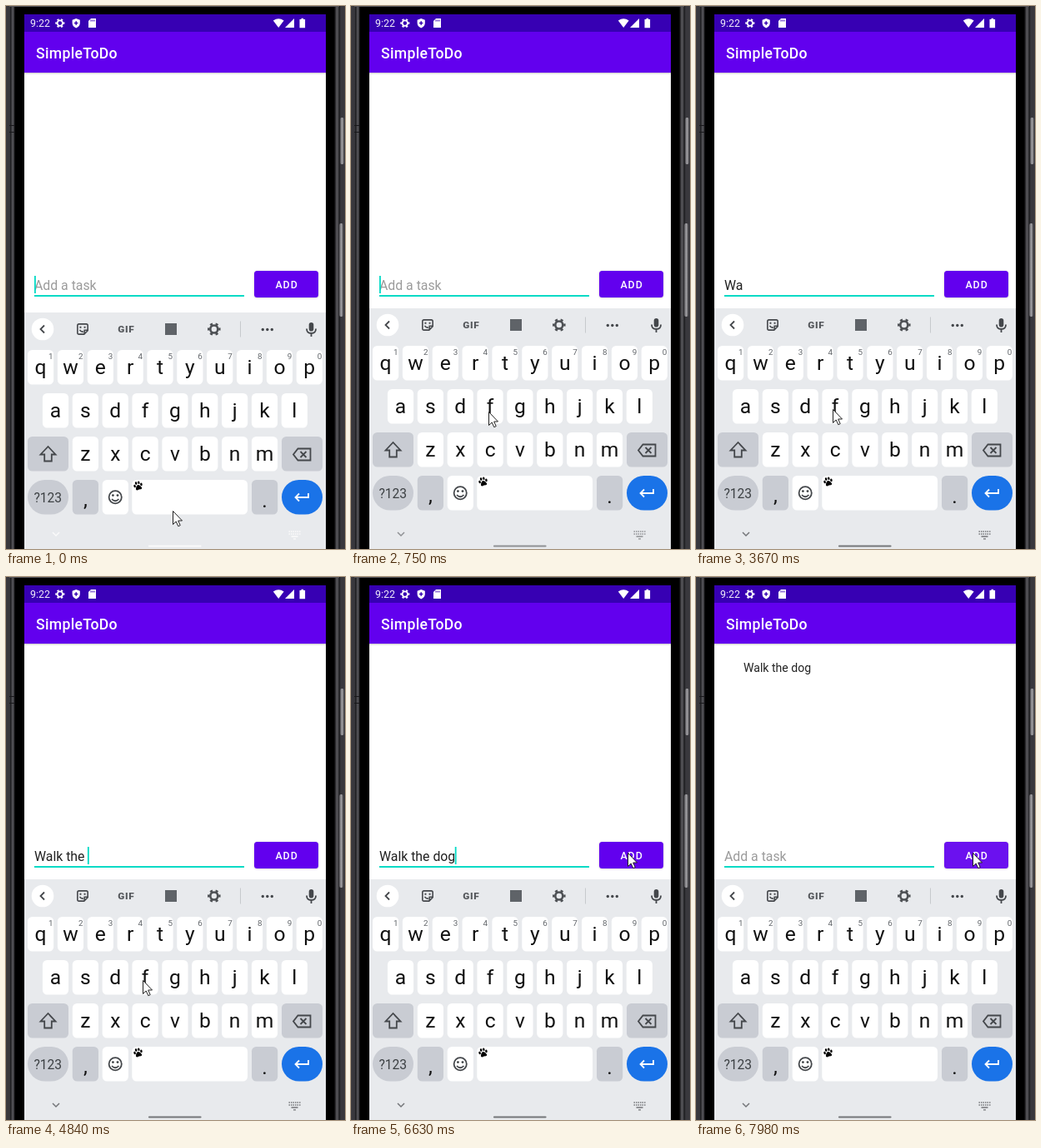
Recreate the animation shown at these times as an HTML page. Size 407x652 px, loop 8000 ms.

```html
<!DOCTYPE html>
<html lang="en">
<head>
<meta charset="utf-8">
<title>To-do list</title>
<style>
html, body { margin: 0; width: 100%; height: 100%; overflow: hidden; background: #000; }
svg { display: block; width: 407px; height: 652px; }
text { font-family: Roboto, "Noto Sans", sans-serif; white-space: pre; }
.mid { text-anchor: middle; }
.field { font-size: 15.84px; }
.key { font-size: 24.6px; fill: #111; }
.hint { font-size: 9.8px; fill: #5f6368; }
.line { fill: none; stroke: #44474b; stroke-width: 1.8; }
</style>
</head>
<body>
<svg viewBox="0 0 407 652">
  <defs>
    <linearGradient id="edgeL">
      <stop offset="0" stop-color="#39383d"/><stop offset=".4" stop-color="#39383d"/>
      <stop offset=".5" stop-color="#1f1f22"/><stop offset=".75" stop-color="#5c5b60"/>
      <stop offset="1" stop-color="#000"/>
    </linearGradient>
    <linearGradient id="edgeR">
      <stop offset="0" stop-color="#000"/><stop offset=".25" stop-color="#5c5b60"/>
      <stop offset=".5" stop-color="#1f1f22"/><stop offset=".6" stop-color="#39383d"/>
      <stop offset="1" stop-color="#39383d"/>
    </linearGradient>
    <linearGradient id="side">
      <stop offset="0" stop-color="#4a494d"/><stop offset=".5" stop-color="#a3a2a6"/>
      <stop offset="1" stop-color="#4a494d"/>
    </linearGradient>
    <linearGradient id="barShade" x2="0" y2="1">
      <stop offset="0" stop-color="#000" stop-opacity=".2"/><stop offset="1" stop-color="#000" stop-opacity="0"/>
    </linearGradient>
    <filter id="blur" x="-20%" y="-40%" width="140%" height="180%"><feGaussianBlur stdDeviation=".8"/></filter>
  </defs>

  <!-- phone body -->
  <rect width="407" height="652"/>
  <rect width="11" height="652" fill="url(#edgeL)"/>
  <rect x="394" width="13" height="652" fill="url(#edgeR)"/>
  <path d="M4 0.5H400" stroke="#57565b"/>
  <path d="M4 143.5H10M4 151.5H10" stroke="#18181a"/>
  <rect x="401" y="134" width="5" height="56" rx="2" fill="url(#side)"/>
  <rect x="400" y="261" width="5" height="112" rx="2" fill="url(#side)"/>

  <!-- app -->
  <rect x="22" y="80" width="362" height="572" fill="#fff"/>
  <rect x="22" y="80" width="362" height="2.5" fill="url(#barShade)"/>
  <rect x="22" y="10" width="362" height="21" fill="#3700b3"/>
  <rect x="22" y="31" width="362" height="49" fill="#6200ee"/>
  <text x="29" y="25" font-size="12.4" fill="#f1edfa">9:22</text>
  <g fill="#fff">
    <path d="M84.2 15l4.600 1.800v3.500q0 4.200-4.600 6.100q-4.600-1.900-4.600-6.100v-3.500z"/>
    <path d="M102 15h6v11h-9v-8z"/>
    <path d="M320.800 17.500q6.400-4.600 12.800 0l-6.400 8.500z"/>
    <path d="M346 15v11h-11z"/>
    <path d="M352.500 16h2v-1.300h2.600V16h2v10.300h-6.600z"/>
  </g>
  <path d="M82 20.500h4.400M84.200 18.300v4.400" stroke="#3700b3" stroke-width="1.500"/>
  <path d="M102 16.500v2M104 16.500v2M106 16.500v2" stroke="#3700b3"/>
  <text x="36" y="63" font-size="17.6" font-weight="500" letter-spacing=".32" fill="#fff">SimpleToDo</text>

  <text id="item" x="57" y="114" font-size="14.08" fill="#222">Walk the dog</text>
  <text id="field" class="field" x="34" y="341"></text>
  <rect x="34" y="347" width="252" height="2" fill="#03dac5"/>
  <rect id="caret" y="324" width="1.8" height="21" fill="#03dac5"/>
  <rect id="shade" x="298" y="318.500" width="77" height="32" rx="3.500" filter="url(#blur)"/>
  <rect id="button" x="298" y="318" width="77" height="32" rx="3.500"/>
  <text x="323.400" y="338.600" font-size="12.320" font-weight="500" letter-spacing="1" fill="#fff">ADD</text>

  <!-- keyboard -->
  <rect x="22" y="380" width="362" height="272" fill="#e8eaed"/>
  <g id="board">
    <rect x="22" y="363" width="362" height="250" fill="#e8eaed"/>
    <circle cx="44" cy="383" r="13.300" fill="#fff"/>
    <path class="line" d="M46 378.500l-4.500 4.500l4.500 4.500"/>
    <g transform="translate(92 383) scale(.88)">
      <path class="line" d="M-5-7h10q2 0 2 2v7l-5 5h-7q-2 0-2-2v-10q0-2 2-2zM7 1.500h-4.500v5M-4 1q2 3 5 2.500"/>
      <path d="M-4-2.500h2.200M1.800-2.500h2.200" stroke="#44474b" stroke-width="2.200"/>
    </g>
    <text class="mid" x="144.300" y="387.300" font-size="11.800" font-weight="900" letter-spacing=".6" fill="#55585c">GIF</text>
    <rect x="191" y="376" width="14" height="14" fill="#5f6368"/>
    <path d="M281.500 373.500V392.500" stroke="#c6c9cd"/>
    <g fill="#44474b">
      <circle cx="308.300" cy="383.500" r="1.700"/>
      <circle cx="313.800" cy="383.500" r="1.700"/>
      <circle cx="319.300" cy="383.500" r="1.700"/>
      <rect x="363.700" y="375" width="5.600" height="10.500" rx="2.800"/>
    </g>
    <path class="line" d="M361 382.500q0 5.500 5.500 5.500t5.500-5.500M366.500 388v4"/>
  </g>
  <g id="nav" fill="none">
    <path d="M56 632l4 4l4-4" stroke-width="1.500"/>
    <path d="M339.500 631h14M339.500 634h14" stroke-width="1.500" stroke-dasharray="1.500 1"/>
    <path d="M342.500 637h8M345 639.800h3" stroke-width="1.300"/>
    <path d="M172 648.500H233.500" stroke-width="2.200" stroke-linecap="round"/>
  </g>
  <path id="mouse" d="M.5 .5V16.500L4.200 13L6.800 18.700L9.200 17.600L6.700 12H11.500Z" fill="#fff" stroke="#222" stroke-width="1"/>
</svg>
<script>
const $ = id => document.getElementById(id);
const board = $('board'), svg = document.querySelector('svg');
const LOOP = 8000, PITCH = 35.85;

const add = (parent, markup) => parent.insertAdjacentHTML('beforeend', markup);
const key = (x, y, w, fill = '#fff', r = 5.5) =>
  add(board, `<rect x="${x}" y="${y}" width="${w}" height="41.5" rx="${r}" fill="${fill}"/>`);
const label = (x, y, s, cls = 'key') => add(board, `<text class="mid ${cls}" x="${x}" y="${y}">${s}</text>`);
const gear = (parent, x, y, r, color) => add(parent, `<g fill="none" stroke="${color}">
  <circle cx="${x}" cy="${y}" r="${r * .58}" stroke-width="${r * .34}"/>
  <circle cx="${x}" cy="${y}" r="${r * .84}" stroke-width="${r * .32}" pathLength="12" stroke-dasharray=".9 1.1" stroke-dashoffset=".45"/></g>`);

gear(svg, 64.8, 20.6, 5.6, '#fff');
gear(board, 249.8, 383, 7.8, '#4e5155');
svg.append($('mouse'));

// letter keys
[['qwertyuiop', 41.6], ['asdfghjkl', 59.5], ['zxcvbnm', 95.4]].forEach(([row, x0], j) => {
  [...row].forEach((c, i) => {
    const x = x0 + i * PITCH, y = 408 + j * 52;
    key(x - 15.6, y, 31.2);
    label(x, y + 29, c);
    if (!j) label(x + 12.2, y + 11, (i + 1) % 10, 'hint');
  });
});

// special keys
const GREY = '#c9ccd3';
key(26, 512, 49, GREY);
key(331, 512, 49, GREY);
key(26, 564, 49, GREY, 20.75);
key(79.8, 564, 31.2, GREY);
key(115.7, 564, 31.2);
key(151.3, 564, 138.7);
key(295, 564, 31.2, GREY);
key(331, 564, 49, '#1a73e8', 20.75);
label(95.4, 596, ',');
label(310.6, 597, '.');
add(board, `<text class="mid" x="50.3" y="591" font-size="15.6" fill="#3c4043">?123</text>
  <path class="line" d="M50.5 524l-9 9.500h4.700v8h8.600v-8h4.700z"/>
  <path class="line" d="M350.500 526.500h15v14h-15l-5.500-7zM353.500 530l7 7M360.500 530l-7 7"/>
  <circle class="line" cx="131.200" cy="584.700" r="7.600"/>
  <path class="line" d="M127 587q4.200 4.500 8.400 0"/>
  <g fill="#3c4043"><circle cx="128.400" cy="582.600" r="1.400"/><circle cx="134" cy="582.600" r="1.400"/></g>
  <path d="M363 580v5h-15M352 580.500l-4.500 4.500l4.500 4.500" fill="none" stroke="#fff" stroke-width="1.800"/>
  <g transform="translate(158.700 571.300) rotate(-15) scale(.9)">
    <ellipse cx="-4.500" cy="-1" rx="1.400" ry="2"/><ellipse cx="-1.800" cy="-4.200" rx="1.400" ry="2"/>
    <ellipse cx="1.800" cy="-4.200" rx="1.400" ry="2"/><ellipse cx="4.500" cy="-1" rx="1.400" ry="2"/>
    <path d="M0-1.500q2 0 3 2.500q2.500 3.500-.5 4.300q-2.500-.8-5 0q-3-.8-.5-4.300q1-2.500 3-2.500z"/>
  </g>`);

// each track holds its latest value: [start ms, value...]
const mouseTrack = [
  [0, 200, 606], [150, 199, 600], [270, 195, 575], [390, 186, 540], [510, 175, 508], [630, 168, 492],
  [750, 165, 487], [870, 167, 491], [1140, 168, 495], [1260, 167, 492], [1400, 166, 488], [1540, 165, 485],
  [1680, 164, 484], [6040, 166, 491], [6190, 172, 500], [6330, 237, 436], [6480, 305, 362], [6630, 332, 331]
];
const typing = [
  [0, 0], [3000, 1], [3130, 2], [3790, 3], [3920, 4], [4060, 5], [4460, 6], [4590, 7], [4710, 8],
  [4840, 9], [5270, 10], [5390, 11], [5510, 12], [7700, 0]
];
const caretTrack = [
  [0, 1], [150, 0], [630, 1], [1140, 0], [1680, 1], [2200, 0], [2720, 1], [3670, 0], [3790, 1],
  [6040, 0], [6630, 1], [7070, 0], [7560, 1], [7700, 0]
];
const buttonTrack = [
  [0, '#6200ee', .2], [7440, '#6a0fef', .3], [7560, '#7622f0', .45],
  [7700, '#7420f0', .4], [7850, '#6f18f0', .3], [7980, '#6b11ef', .2]
];
const navTrack = [[0, '#fafafa'], [150, '#d5d6d9'], [270, '#b9bbbe'], [390, '#a0a2a5'], [750, '#8f9194'], [870, '#747679']];
const at = (track, t) => track.findLast(k => k[0] <= t).slice(1);

function draw(now) {
  const t = now % LOOP;
  const [x, y] = at(mouseTrack, t), [count] = at(typing, t), [color, depth] = at(buttonTrack, t);
  const field = $('field');
  field.textContent = count ? 'Walk the dog'.slice(0, count) : 'Add a task';
  field.setAttribute('fill', count ? '#212121' : '#9b9b9b');
  $('caret').setAttribute('x', 34 + (count ? field.getComputedTextLength() - .5 : 0));
  $('caret').setAttribute('opacity', at(caretTrack, t)[0]);
  $('item').setAttribute('opacity', t < 7700 ? 0 : 1);
  $('button').setAttribute('fill', color);
  $('shade').setAttribute('opacity', depth);
  $('nav').setAttribute('stroke', at(navTrack, t)[0]);
  board.setAttribute('transform', `translate(0 ${t < 150 ? 5 : 0})`);
  $('mouse').setAttribute('transform', `translate(${x} ${y})`);
  requestAnimationFrame(draw);
}
requestAnimationFrame(draw);
</script>
</body>
</html>
```
